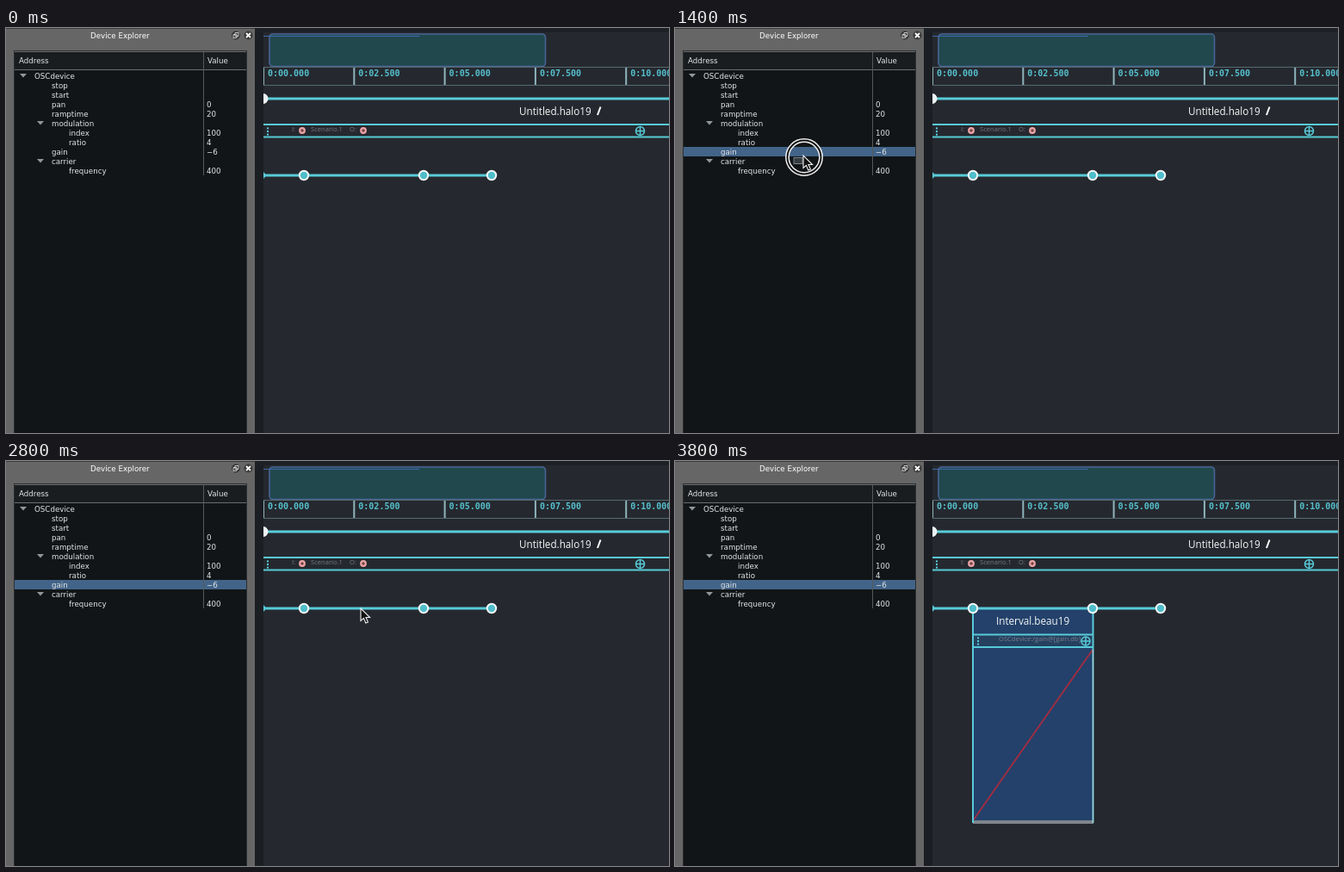
Recreate the animation shown at these times as an HTML page. Size 770 by 470 pixels, loop 3.9 s.

```html
<!DOCTYPE html>
<html lang="en">
<head>
<meta charset="utf-8">
<title>Device Explorer</title>
<style>
  html, body { margin: 0; width: 100%; height: 100%; overflow: hidden; background: #25292f; }
  svg { display: block; width: 770px; height: 470px; }
  text { white-space: pre; }
  .ui { font: 8.7px "DejaVu Sans", sans-serif; fill: #e4e5e6; }
  .title { font: 11.7px "Open Sans", "Noto Sans", sans-serif; fill: #f6f8f9; }
  .small { font: 7.6px "Open Sans", "Noto Sans", sans-serif; fill: #767b80; }
  .time { font: bold 10px "DejaVu Sans Mono", monospace; fill: #55bfcc; }
  .line { fill: none; stroke: #58cbd8; }
  .node { fill: #4fbdca; stroke: #f4f8f9; stroke-width: 2; }
  .port { fill: #6e4247; stroke: #eba3a3; stroke-width: 2.2; }
</style>
</head>
<body>
<svg viewBox="0 0 770 470">
  <defs>
    <clipPath id="stageClip"><rect x="299" width="471" height="470"/></clipPath>
    <clipPath id="slotClip"><rect x="347" y="202" width="137" height="14"/></clipPath>
    <g id="target" class="line" stroke-width="1.5">
      <circle r="5"/>
      <path d="M-5 0H5M0-5V5"/>
    </g>
    <g id="grip" fill="#58cbd8">
      <rect x="-1" y="-4.6" width="2" height="2"/>
      <rect x="-1" y="-1" width="2" height="2"/>
      <rect x="-1" y="2.6" width="2" height="2"/>
    </g>
  </defs>

  <!-- device panel -->
  <rect width="289" height="470" fill="#666"/>
  <rect width="289" height="1" fill="#3c3c3c"/>
  <rect x="9" y="26" width="271" height="444" fill="#2c2e30"/>
  <rect x="10" y="27" width="269" height="443" fill="#111517"/>
  <rect x="10" y="28" width="269" height="20" fill="#1a1d20"/>
  <path d="M10 27.5H279M10 48.5H279" stroke="#6b6d6f" fill="none"/>
  <rect id="highlight" x="10" y="138" width="269" height="11" fill="#426489"/>
  <path d="M229.5 28V171" stroke="#55585a"/>
  <text class="ui" x="98" y="12" style="fill:#fff">Device Explorer</text>
  <text class="ui" x="15" y="41">Address</text>
  <text class="ui" x="234" y="41">Value</text>
  <g fill="none" stroke="#dcdcdc">
    <circle cx="267" cy="8.5" r="4.3" stroke="#252525" fill="#333"/>
    <path d="M266 5.5H270V9.5H266ZM264 7.5H268V11.5H264Z" stroke-width=".9"/>
    <circle cx="281.5" cy="8.5" r="5" stroke="none" fill="#3a3a3a"/>
    <path d="M279 6L284 11M284 6L279 11" stroke="#fff" stroke-width="1.8"/>
  </g>
  <g id="tree"></g>

  <!-- score -->
  <rect x="289" width="10" height="470" fill="#1b1e22"/>
  <rect x="289" width="481" height="5" fill="#1d2025"/>
  <g clip-path="url(#stageClip)">
    <rect x="306" y="7" width="320.5" height="37.5" rx="4" fill="#21484d" stroke="#496495" stroke-width="1.6"/>
    <path d="M299 9.5H480" stroke="#3f68ae" stroke-width="1.2"/>
    <path d="M299 45.5H770M299 66.5H770" stroke="#55696f"/>
    <g id="ruler"></g>
    <path class="line" d="M299 82H770" stroke-width="3"/>
    <circle class="node" cx="298.5" cy="82" r="5" style="fill:#e8f4f6"/>
    <text class="title" x="596" y="101">Untitled.halo19</text>
    <path d="M687 101L690.5 91.5" stroke="#fff" stroke-width="2"/>
    <path class="line" d="M299 112H770M299 126.5H770" stroke-width="2"/>
    <use href="#grip" x="304" y="120"/>
    <text class="small" x="332" y="120">I:</text>
    <text class="small" x="354" y="120">Scenario.1</text>
    <text class="small" x="399" y="120">O:</text>
    <circle class="port" cx="344" cy="119" r="2.8"/>
    <circle class="port" cx="415" cy="119" r="2.8"/>
    <use href="#target" x="736.5" y="119.5"/>

    <g id="interval">
      <rect x="346" y="171" width="140" height="246" fill="#23416a"/>
      <rect x="346" y="202" width="140" height="14" fill="#26405f"/>
      <path d="M347 416L485 219" stroke="#a72c41" stroke-width="1.8"/>
      <rect x="346" y="417" width="140" height="4" fill="#80858b"/>
      <path class="line" d="M346 171V420M485.5 171V420M346 201.5H486M346 216H486" stroke-width="2"/>
      <path d="M485.5 219V420" stroke="#b5cbd5"/>
      <text class="title" x="373" y="190">Interval.beau19</text>
      <use href="#grip" x="352" y="209"/>
      <g clip-path="url(#slotClip)">
        <text class="small" x="376" y="209" style="fill:#77828f">OSCdevice:/gain@[gain.db]</text>
      </g>
      <use href="#target" x="477" y="209"/>
    </g>

    <path class="line" d="M299 171H564" stroke-width="3"/>
    <path d="M299 167L302.5 171L299 175Z" fill="#58cbd8"/>
    <circle class="node" cx="346" cy="171" r="5.2"/>
    <circle class="node" cx="485" cy="171" r="5.2"/>
    <circle class="node" cx="564" cy="171" r="5.2"/>
  </g>

  <!-- pointer -->
  <rect id="ghost" width="10" height="7" fill="#59636b" fill-opacity=".5" stroke="#7b858b"/>
  <g id="pointer">
    <g id="ring" fill="none">
      <circle cx="1" cy="2" r="19.5" stroke="#101214" stroke-width="3"/>
      <circle cx="1" cy="2" r="21.2" stroke="#f0f0f0" stroke-width="1.5"/>
      <circle cx="1" cy="2" r="17.8" stroke="#f0f0f0" stroke-width="1.5"/>
    </g>
    <path id="arrow" d="M0 0V14.5L3.4 11.4L5.8 17L8.4 15.9L6 10.5H10.6Z" fill="#111" stroke="#f2f2f2" stroke-width="1.1"/>
    <path id="hand" d="M-3 9L-6 3.5Q-6.2 1.6-4.4 2.2L-3 4L-4.6-2Q-4.4-4-2.8-3L-1.4 1L-1.6-4Q-.2-6 1-4L1.3 1L2.4-3.4Q4-4.6 4.7-2.8L4 2L5.2-.6Q7-1.4 7.2.4L4.8 9Z" fill="#fff" stroke="#15181b" stroke-width=".9"/>
  </g>
</svg>
<script>
  const LOOP = 3900, STEP = 100;
  const $ = id => document.getElementById(id);

  // [name, indent, value, has children]
  const rows = [
    ["OSCdevice", 0, "", true], ["stop", 1], ["start", 1], ["pan", 1, "0"],
    ["ramptime", 1, "20"], ["modulation", 1, "", true], ["index", 2, "100"],
    ["ratio", 2, "4"], ["gain", 1, "−6"], ["carrier", 1, "", true],
    ["frequency", 2, "400"]
  ];
  $("tree").innerHTML = rows.map(([name, depth, value = "", open], i) => {
    const x = 33 + depth * 20, y = 56 + i * 11;
    const arrow = open ? `<path d="M${x - 17} ${y - 3}h8l-4 4.5z" fill="#92979a"/>` : "";
    return `${arrow}<text class="ui" x="${x}" y="${y + 3}">${name}</text>` +
      `<text class="ui" x="233" y="${y + 3}">${value}</text>`;
  }).join("");

  const times = ["0:00.000", "0:02.500", "0:05.000", "0:07.500", "0:10.000"];
  $("ruler").innerHTML = times.map((label, i) => {
    const x = 299 + i * 105.3;
    return `<path d="M${x} 46V66" stroke="#8fb4bb" stroke-width="2"/>` +
      `<text class="time" x="${x + 5}" y="56">${label}</text>`;
  }).join("");

  // [time, x, y]
  const path = [
    [100, 210, 378], [300, 150, 260], [500, 95, 165], [700, 76, 141],
    [1200, 76, 141], [1300, 92, 143], [1600, 263, 158], [1700, 313, 161],
    [1800, 360, 164], [1900, 394, 166], [2000, 410, 167], [2300, 412, 171],
    [3100, 412, 171], [3300, 417, 240], [3600, 430, 472]
  ];

  function pointAt(t) {
    const i = path.findIndex(p => p[0] > t);
    if (i < 0) return path[path.length - 1].slice(1);
    if (i === 0) return path[0].slice(1);
    const [t0, x0, y0] = path[i - 1], [t1, x1, y1] = path[i];
    const u = (t - t0) / (t1 - t0);
    return [x0 + (x1 - x0) * u, y0 + (y1 - y0) * u];
  }

  const show = (id, on) => $(id).setAttribute("visibility", on ? "visible" : "hidden");
  const move = (id, x, y) => $(id).setAttribute("transform", `translate(${x} ${y})`);
  const within = (t, from, to) => t >= from && t < to;

  function draw(now) {
    const t = Math.floor((now % LOOP) / STEP) * STEP;
    const [x, y] = pointAt(t);
    const active = within(t, 100, 3600);
    const dragging = within(t, 1200, 2500);
    const grabbing = within(t, 2900, 3200);
    const lag = (x - pointAt(t - STEP)[0]) * 0.35;

    move("pointer", x, y);
    move("ghost", x + 9 - lag, y + 2.5);
    show("highlight", t >= 800);
    show("interval", t >= 2900);
    show("ring", dragging);
    show("ghost", within(t, 1300, 2500));
    show("arrow", active && !grabbing);
    show("hand", grabbing);
  }

  const start = performance.now();
  function tick() {
    draw(performance.now() - start);
    requestAnimationFrame(tick);
  }
  tick();
</script>
</body>
</html>
```
